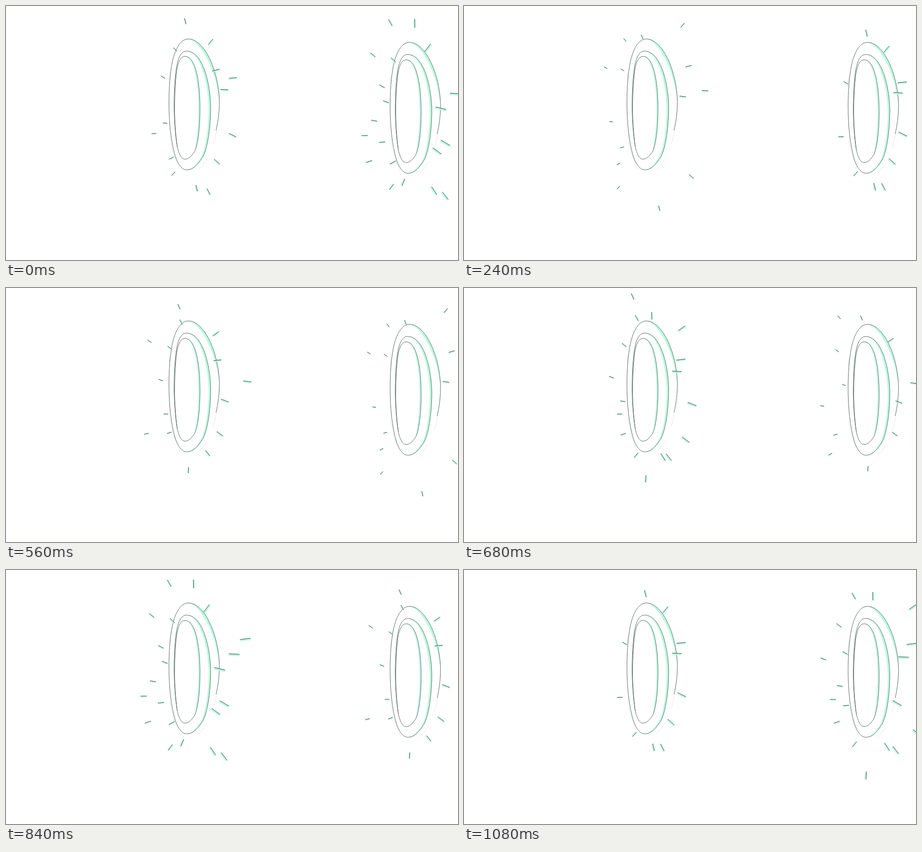
An HTML page with a canvas that plays this animation: 932 px wide and 524 px high, repeating every 1160 ms.

```html
<!DOCTYPE html>
<html lang="en">
<head>
<meta charset="utf-8">
<title>Ringing loops</title>
<style>
  html, body { margin: 0; width: 100%; height: 100%; overflow: hidden; background: #fff; }
  canvas { display: block; }
</style>
</head>
<body>
<canvas id="stage" width="932" height="524"></canvas>
<script>
const ctx = document.getElementById('stage').getContext('2d');
const LOOP = 1160, HOLD = 120, POSES = 10;
const MINT = '#b9fde0', LINE = '#566b63', INK = '#1b4a3b';
const RIM = { x: 384, y: 212, rx: 57, ry: 155 };
const { PI, cos, sin } = Math;

// One pen line that winds inwards three times
const coil = new Path2D(`M433 257 C438 236 440 216 440 196 C438 130 408 68 376 68
  C360 68 349 88 343 115 C338 140 336 170 336 200
  C336 240 340 280 349 310 C356 330 364 338 373 338 C387 338 397 325 406 311
  C417 290 422 245 422 207 C421 160 406 93 372 93
  C360 93 353 110 350 138 C347 165 346 200 347 225 C348 250 350 272 353 290
  C357 307 362 316 369 316 C378 316 384 307 389 300 C397 282 400 245 400 212
  C400 160 392 104 369 104 C358 104 353 122 351 142
  C348 170 347 205 348 232 C349 255 351 275 353 290`);

// Crescents inside the right half of each turn
const shade = new Path2D(`M376 68 C408 68 438 130 440 196 C433 132 403 74 376 68Z
  M373 338 C387 338 397 325 406 311 C417 290 422 245 422 207 C421 160 406 93 372 93
  C402 95 416 160 418 207 C418 245 413 290 403 311 C394 325 386 336 373 338Z
  M369 104 C392 104 400 160 400 212 C400 245 397 282 389 300
  C393 280 397 245 397 212 C397 160 389 107 369 104Z`);

const traces = new Path2D(`M434 258 Q432 272 427 286 M414 316 Q407 329 397 338
  M337 268 Q343 308 358 336 M338 138 L336 153`);

// Places on the rim, in degrees, where each pose sends out sparks
const FIRST = -2;
const waves = [
  [-98, -23, 15, 69, 161],
  [-57, -15, 41, 83, 125, 203],
  [-128, -31, 139, 169],
  [-10, 150, 209],
  [-107],
  [-46, 6, 32, 97, 187],
  [-24, 56, 146, 162, 215, 246],
  [-87, -15, 62, 121, 172],
  [21, 157, 198],
  [-59, -3, 31, 111, 138, 188, 224]
];

const sparks = waves.flatMap((angles, i) => angles.map(deg => {
  const born = FIRST + i;
  const phi = deg * PI / 180;
  return {
    born, phi,
    life: Math.min(4, 9 - born),
    heading: phi + 0.1 + 0.21 * cos(2 * phi + PI / 6)
  };
}));

function stroke(x, y, dx, dy, width, color) {
  ctx.lineWidth = width;
  ctx.strokeStyle = color;
  ctx.beginPath();
  ctx.moveTo(x - dx, y - dy);
  ctx.lineTo(x + dx, y + dy);
  ctx.stroke();
}

function drawSpark({ born, phi, life, heading }, pose) {
  const age = (pose - born + POSES) % POSES;
  if (age >= life) return;
  const u = age / (life - 1);
  const near = cos(phi);
  // Sparks speed up outwards, and look bigger on the near, right-hand side
  const travel = (14 * life - 4) * (1 + 0.12 * near) * u ** 1.5;
  const pulse = 1 + 0.25 * cos((pose - 7) / POSES * 2 * PI);
  const len = (14 + 4 * near) * pulse;
  const cx = cos(heading), cy = sin(heading);
  const x = RIM.x + RIM.rx * near + cx * travel;
  const y = RIM.y + RIM.ry * sin(phi) + cy * travel;
  // The tint lies clockwise of the line, or below it on the left
  const side = (cx < -0.5 ? -1 : 1) * len * 0.09;
  const dx = cx * len / 2, dy = cy * len / 2;
  stroke(x - cy * side, y + cx * side, dx, dy, len * 0.17, MINT);
  stroke(x, y, dx, dy, 1, INK);
}

function drawRing(x, y, pose) {
  ctx.save();
  ctx.translate(x, y);
  ctx.fillStyle = MINT;
  ctx.fill(shade);
  ctx.lineWidth = 0.7;
  ctx.strokeStyle = '#ddd';
  ctx.stroke(traces);
  ctx.lineWidth = 1;
  ctx.strokeStyle = LINE;
  ctx.stroke(coil);
  for (const spark of sparks) drawSpark(spark, pose);
  ctx.restore();
}

const poseAt = t => Math.floor(t / HOLD) % POSES;

function draw() {
  const t = (performance.now() + 0.5) % LOOP;
  ctx.fillStyle = '#fff';
  ctx.fillRect(0, 0, 932, 524);
  drawRing(0, 0, poseAt(t));
  drawRing(456, 7, poseAt(t + 880));
  requestAnimationFrame(draw);
}
draw();
</script>
</body>
</html>
```
